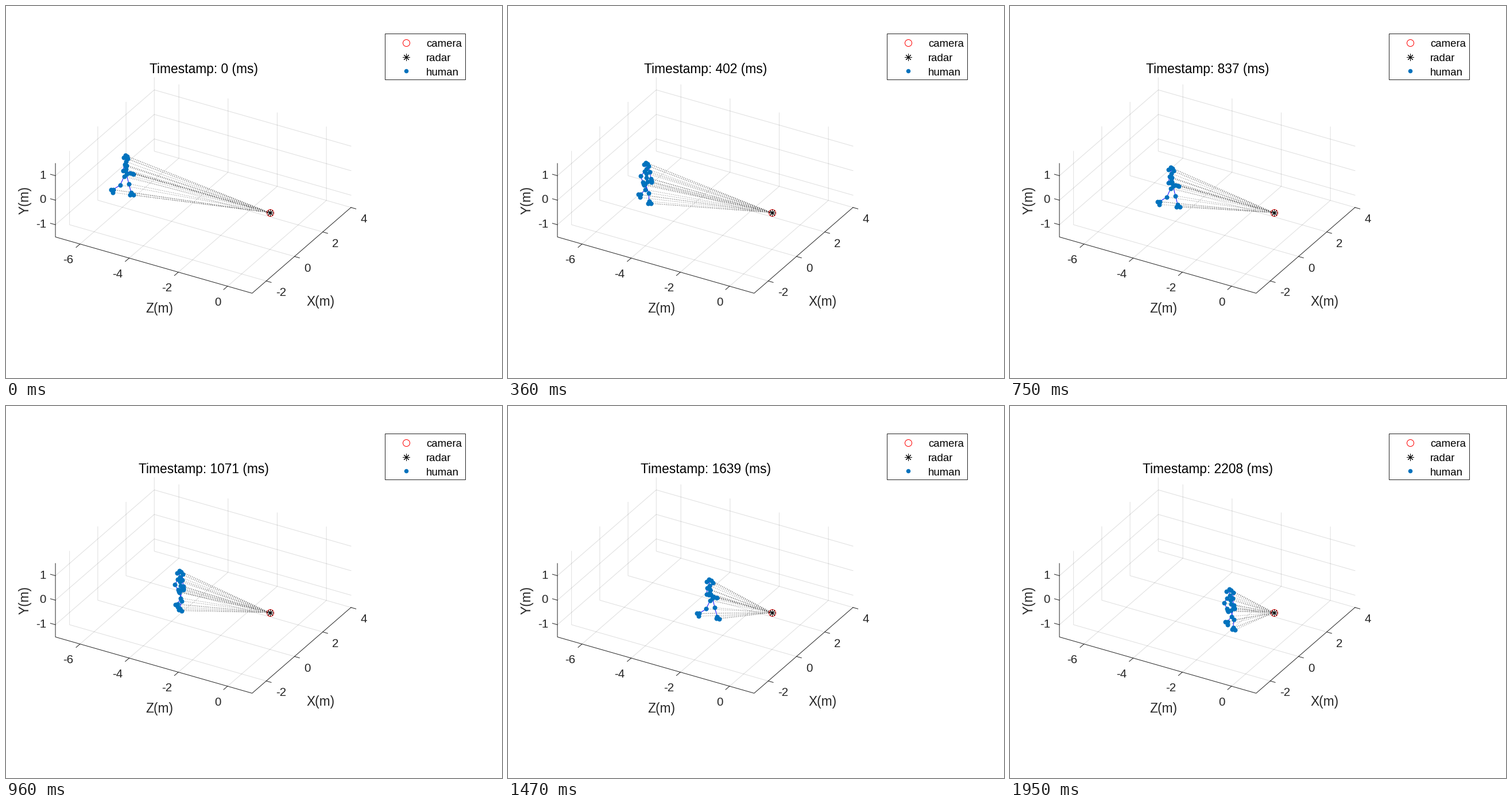
Animation, 864 px wide and 648 px high, one loop 1.98 s. Source, as a matplotlib script:

```python
import math

import matplotlib.pyplot as plt
import numpy as np
from matplotlib.animation import FuncAnimation
from matplotlib.collections import LineCollection

W, H, DPI = 864, 648, 72          # at 72 dpi one point is one pixel
FRAMES, STEP = 66, 30
STRIDE = 24.5                     # frames per walking cycle
INK, BLUE = "#262626", "#0072bd"
TICK, LABEL, LEGEND = 20.6, 22.75, 18.6

plt.rcParams["font.family"] = "Liberation Sans"
fig = plt.figure(figsize=(W / DPI, H / DPI), dpi=DPI, facecolor="white")
ax = fig.add_axes([0, 0, 1, 1])
ax.set(xlim=(0, W), ylim=(H, 0))
ax.axis("off")

# Orthographic view: screen vectors for one metre along each axis.
ORIGIN = np.array([459.7, 360.0])
EX, EY, EZ = np.array([[24.6, -21.35], [0, -42.7], [42.83, 12.25]])
X0, X1, Y0, Y1, Z0, Z1 = -3, 4, -1.5, 1.5, -7, 1


def project(x, y, z):
    return ORIGIN + x * EX + y * EY + z * EZ


def line(points, **style):
    style = {"color": INK, "lw": 1, **style}
    ax.plot(*np.transpose(points), **style)


def text(x, y, s, size, color=INK, ha="center", **kw):
    return ax.text(x, y, s, fontsize=size, color=color, ha=ha,
                   va="baseline", **kw)


def tick(p, axis, value, dx, dy, ha):
    line([p, p + 9 * axis / np.hypot(*axis)])
    text(p[0] + dx, p[1] + dy + 0.36 * TICK, str(value), TICK, ha=ha)


def draw_box():
    grid = {"alpha": 0.15, "zorder": 1}
    for z in range(-6, 1, 2):
        line([project(X0, Y0, z), project(X1, Y0, z), project(X1, Y1, z)],
             **grid)
        tick(project(X0, Y0, z), -EX, z, -11.4, 26.3, "right")
    for x in range(-2, 5, 2):
        line([project(x, Y0, Z1), project(x, Y0, Z0), project(x, Y1, Z0)],
             **grid)
        tick(project(x, Y0, Z1), EZ, x, 16.5, 19, "left")
    for y in (-1, 0, 1):
        line([project(X0, y, Z0), project(X1, y, Z0), project(X1, y, Z1)],
             **grid)
        tick(project(X0, y, Z0), -EZ, y, -16, -2.5, "right")
    line([project(X0, Y1, Z0), project(X0, Y0, Z0),
          project(X0, Y0, Z1), project(X1, Y0, Z1)])
    text(267, 534, "Z(m)", LABEL)
    text(548.5, 521.8, "X(m)", LABEL)
    text(40, 338, "Y(m)", LABEL, rotation=90, rotation_mode="anchor")


def circle(x, y):
    ax.plot(x, y, "o", ms=12, mfc="none", mec="red", mew=1, zorder=6)


def star(x, y):
    ax.plot(x, y, marker=(8, 2, 0), ms=12, mec="black", mew=1, zorder=7)


def draw_legend():
    ax.add_patch(plt.Rectangle((659.5, 47.5), 140, 80, fc="white", ec=INK,
                               lw=1))
    circle(696.5, 64)
    star(696.5, 88.7)
    ax.plot(696.5, 113.3, "o", ms=7.5, color=BLUE, mew=0)
    for i, name in enumerate(("camera", "radar", "human")):
        text(732.2, 71 + 24.8 * i, name, LEGEND, "black", "left")


# Limb joints relative to the head: rest position and swing of the stride.
ARMS = [{"elbow": [(-7.2, 22.7), (2.5, 1.3)],
         "wrist": [(0.6, 29.9), (6.7, -1.9)]},
        {"elbow": [(3.6, 14.5), (-2.3, 1)],
         "wrist": [(4, 23.8), (-4, -2.1)]}]
LEGS = [{"knee": [(3.9, 45.9), (4.1, 1.1)],
         "foot": [(0.8, 59.8), (11.2, 5.2)]},
        {"knee": [(-0.4, 49.9), (-6.6, -0.7)],
         "foot": [(-7.6, 62.9), (-13.9, -4.6)]}]

# Ankle, heel and toe of a trailing and of a leading foot.
TRAIL = np.array([(2, -1.2), (-2, -1.2), (1.5, 3.8)])
LEAD = np.array([(0, -2.2), (-1.8, 1), (3.8, 1.5)])


def head_at(n):
    """Walks towards the radar, speeding up, slowing down and bobbing."""
    bob = 2.5 * math.cos(math.tau * (n - 41) / STRIDE)
    return np.array([208.5 + n * (2.955 - 0.00038 * (n - 38) ** 2),
                     263.8 + 0.85 * n + bob])


def skeleton(n):
    """Joint positions and the bone chains between them."""
    s = n / (FRAMES - 1)
    swing = (math.tanh(1.6 * math.cos(math.tau * n / STRIDE))
             / math.tanh(1.6))
    lean = np.array([5 * (s - 0.5), 0])

    def place(limb, name):
        rest, reach = np.array(limb[name])
        return rest + swing * reach

    face = np.array([(-1, -2.5), (2.5, -0.5), (-3.7 - 2.3 * s, 1.3)])
    neck, hip = np.array([0.3, 8.5]), np.array([1.7, 32.8]) + lean
    spine = [neck + f * (hip - neck) for f in (0.33, 0.62)]
    shoulders = np.array([(-2 - 3 * s, 13), (3.5 + 3 * s, 3.5)])
    hips = hip + np.array([(2.2, -2), (-2.2, 2)])

    joints = [*face, neck, *spine, *shoulders, *hips]
    bones = [[face[0], neck, *spine, hip], [face[1], face[0], face[2]], hips]
    for arm, shoulder in zip(ARMS, shoulders):
        elbow, wrist = place(arm, "elbow"), place(arm, "wrist")
        hand, tip = (wrist + f * (wrist - elbow) for f in (0.35, 0.5))
        joints += [elbow, wrist, hand, tip]
        bones.append([neck, shoulder, elbow, wrist, tip])
    for leg, socket, side in zip(LEGS, hips, (1, -1)):
        knee, foot = place(leg, "knee") + lean, place(leg, "foot") + lean
        ahead = (1 + side * swing) / 2
        ankle, heel, toe = foot + TRAIL + ahead * (LEAD - TRAIL)
        joints += [knee, ankle, heel, toe]
        bones += [[socket, knee, ankle, toe], [ankle, heel]]
    head = head_at(n)
    return head + np.array(joints), [head + np.array(b) for b in bones]


draw_box()
draw_legend()
circle(*ORIGIN)
star(*ORIGIN)

title = text(344.2, 116.7, "", LABEL, "black")
rays = LineCollection([], colors="#484848", linewidths=0.75,
                      linestyles=[(0, (1.3, 3))], zorder=3)
limbs = LineCollection([], colors="blue", linewidths=1, zorder=4)
ax.add_collection(rays, autolim=False)
ax.add_collection(limbs, autolim=False)
dots, = ax.plot([], [], "o", ms=8, color=BLUE, mew=0, zorder=5)


def update(n):
    shot = n + (n >= 62)
    title.set_text(f"Timestamp: {math.ceil(33.445 * shot)} (ms)")
    joints, bones = skeleton(n)
    rays.set_segments([[ORIGIN, p] for p in joints])
    limbs.set_segments(bones)
    dots.set_data(*joints.T)
    return title, rays, limbs, dots


anim = FuncAnimation(fig, update, frames=FRAMES, interval=STEP, repeat=True,
                     repeat_delay=0, blit=False)
plt.show()
```
